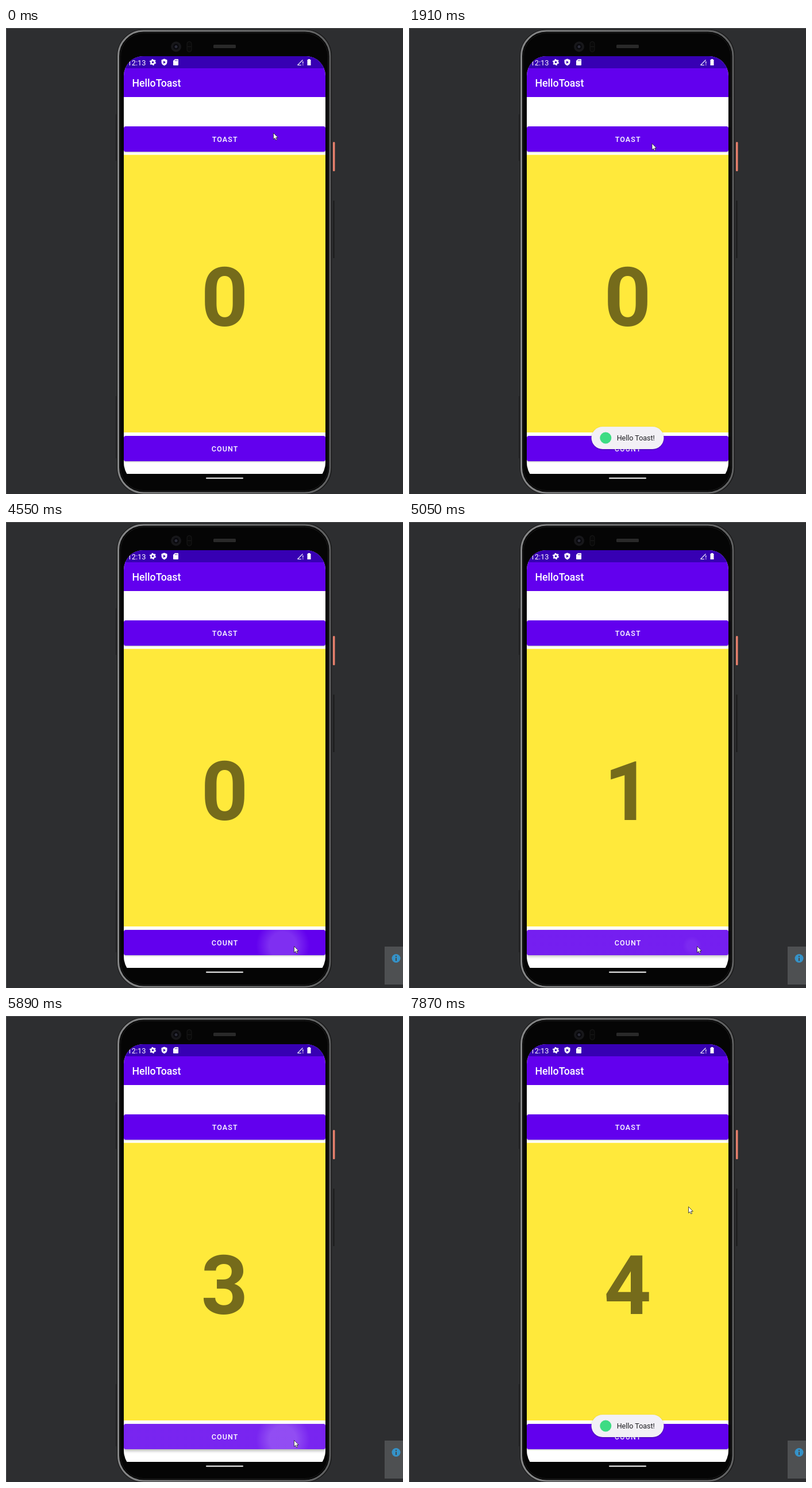
Recreate the animation shown at these times as an HTML page. Size 691 by 810 pixels, loop 7.99 s.

```html
<!DOCTYPE html>
<html lang="en">
<head>
<meta charset="utf-8">
<title>HelloToast</title>
<style>
html, body { margin: 0; width: 100%; height: 100%; overflow: hidden; background: #2d2e30; }
svg { display: block; width: 691px; height: 810px; font-family: Roboto, sans-serif; }
.label { font-size: 12.5px; font-weight: 500; letter-spacing: 1.1px; fill: #fff; text-anchor: middle; }
#toast { transform-origin: 380.5px 712.5px; }
#pill { filter: drop-shadow(0 1px 1px rgba(0,0,0,.3)); }
</style>
</head>
<body>
<svg viewBox="0 0 691 810">
  <defs>
    <clipPath id="screen"><path d="M205 83a34 34 0 0 1 34-34h283a34 34 0 0 1 34 34v672a40 40 0 0 1-5.400 20H210.400a40 40 0 0 1-5.400-20z"/></clipPath>
    <clipPath id="clip0"><rect x="205" y="171" width="351" height="44" rx="3.500"/></clipPath>
    <clipPath id="clip1"><rect x="205" y="709" width="351" height="44" rx="3.500"/></clipPath>
    <radialGradient id="glow">
      <stop offset=".5" stop-color="#fff"/>
      <stop offset="1" stop-color="#fff" stop-opacity="0"/>
    </radialGradient>
    <linearGradient id="metal">
      <stop offset="0" stop-color="#858687"/>
      <stop offset="1" stop-color="#5f6061"/>
    </linearGradient>
  </defs>

  <!-- Desktop and phone body -->
  <rect width="691" height="810" fill="#2d2e30"/>
  <path d="M0 .5H691M.5 0V810" stroke="#505254"/>
  <path d="M191.500 150v81M191.500 640v108" stroke="#1c1c1d"/>
  <path d="M570.500 300v100" stroke="#1a1a1b" stroke-width="2"/>
  <rect x="569" y="198" width="3.500" height="51" rx="1.500" fill="#e8806c"/>
  <rect x="193" y="2.500" width="374" height="808" rx="46" fill="#181818"/>
  <rect x="195.500" y="5" width="368.500" height="803" rx="44" fill="#050505" stroke="url(#metal)" stroke-width="3"/>
  <rect x="199" y="8.500" width="361.500" height="796" rx="41" fill="none" stroke="#1d1d1d"/>
  <circle cx="296" cy="32.500" r="9" fill="#17171a"/>
  <circle cx="296" cy="32.500" r="5" fill="#09090d"/>
  <circle cx="296" cy="32.500" r="2.500" fill="#2b2c39"/>
  <rect x="315" y="23.500" width="8" height="18" rx="4" fill="#090909" stroke="#191919"/>
  <path d="M316 32.500h6" stroke="#191919"/>
  <rect x="361" y="29" width="39" height="6" rx="1.500" fill="#292929"/>
  <path d="M349 782.500h63" stroke="#fff" stroke-width="2" stroke-linecap="round"/>

  <g clip-path="url(#screen)">
    <rect x="205" y="49" width="351" height="726" fill="#fff"/>
    <rect x="205" y="49" width="351" height="71" fill="#6200ee"/>
    <rect x="205" y="49" width="351" height="21" fill="#3700b3"/>
    <text x="211.500" y="64.500" font-size="12.800" fill="#fff">12:13</text>
    <g fill="#fff">
      <circle cx="255.500" cy="59.500" r="3.100" fill="none" stroke="#fff" stroke-width="2.600"/>
      <circle cx="255.500" cy="59.500" r="4.800" fill="none" stroke="#fff" stroke-width="1.600" stroke-dasharray="2.500 2.527"/>
      <path d="M275.500 53.500l5 2v3.500q0 4.500-5 6.500-5-2-5-6.500v-3.500z"/>
      <path d="M274 57l4 2.500-4 2.500z" fill="#3700b3"/>
      <path d="M294 54h5q1 0 1 1v9q0 1-1 1h-7q-1 0-1-1v-7z"/>
      <path d="M294.500 55.500v2m1.800-2v2m1.800-2v2" stroke="#3700b3" stroke-width=".8"/>
      <path d="M507.500 64.500h6.500m-6.500 0l9-9" fill="none" stroke="#fff" stroke-width="1.100"/>
      <path d="M516.800 58v4m0 1.200v1.500" stroke="#fff" stroke-width="1.200"/>
      <path d="M526 54h3v1h1.500v10h-6v-10h1.500z"/>
    </g>
    <text x="219.500" y="102.300" font-size="17.700" font-weight="500" fill="#fff">HelloToast</text>

    <rect x="205" y="220.500" width="351" height="482.500" fill="#ffe93b"/>
    <text id="digit" x="380.500" y="517.800" font-size="143" font-weight="700" text-anchor="middle" fill="#000" fill-opacity=".54">0</text>

    <rect id="button0" x="205" y="171" width="351" height="44" rx="3.500" fill="#6200ee"/>
    <g id="ripple0" clip-path="url(#clip0)"></g>
    <text class="label" x="381.200" y="197.500">TOAST</text>
    <rect id="button1" x="205" y="709" width="351" height="44" rx="3.500" fill="#6200ee"/>
    <g id="ripple1" clip-path="url(#clip1)"></g>
    <text class="label" x="381.200" y="735.500">COUNT</text>

    <g id="toast">
      <rect id="pill" x="317.500" y="693" width="126" height="39" rx="19.500" fill="#f2f0f5"/>
      <g id="message">
        <circle cx="342.300" cy="712.500" r="10" fill="#3ddc84"/>
        <text x="361.700" y="717.200" font-size="12.500" fill="#1b1b1f">Hello Toast!</text>
      </g>
    </g>
  </g>

  <g id="notice">
    <rect x="659" y="738" width="32" height="66" fill="#4e5052"/>
    <circle cx="679" cy="758.500" r="7.500" fill="#3592c8"/>
    <path d="M679 754v2m0 1.500v5.500" stroke="#45484a" stroke-width="2"/>
  </g>
  <path id="cursor" d="M.5.500v11l2.500-2.300 1.800 3.800 1.800-.8-1.700-3.700h3.400z" fill="#fff" stroke="#222" stroke-width=".8"/>
</svg>

<script>
const LOOP = 7990, NOTICE_AT = 2270;
const MOVE_TIME = 360, HOLD = 180, RIPPLE_TIME = 660;
const TOAST_DELAY = 240, TOAST_END = 2370;

const START = { x: 465, y: 182 };
const MOVES = [
  { at: 120, x: 440, y: 192 },
  { at: 520, x: 422, y: 196 },
  { at: 1910, x: 484, y: 710 },
  { at: 3670, x: 501, y: 737 },
  { at: 6010, x: 467, y: 182 },
  { at: 6760, x: 430, y: 187 },
  { at: 7510, x: 486, y: 331 },
];
const CENTER = { x: 380.5, y: [193, 731] };

const $ = id => document.getElementById(id);
const clamp = v => Math.max(0, Math.min(1, v));
const mix = (a, b, k) => a + (b - a) * k;
const easeOut = k => 1 - (1 - k) ** 3;

function pointer(t) {
  return MOVES.reduce((p, m) => {
    const k = easeOut(clamp((t - m.at) / MOVE_TIME));
    return { x: mix(p.x, m.x, k), y: mix(p.y, m.y, k) };
  }, START);
}

// Each press lands on the button under the pointer.
const presses = [1100, 4490, 5040, 5350, 5830, 7050].map(at => {
  const p = pointer(at), button = p.y < 400 ? 0 : 1;
  const circle = document.createElementNS('http://www.w3.org/2000/svg', 'circle');
  circle.setAttribute('fill', 'url(#glow)');
  $('ripple' + button).append(circle);
  return { at, ...p, button, circle };
});
const toasts = presses.filter(p => p.button === 0);
const counts = presses.filter(p => p.button === 1);

function drawButtons(t) {
  const lift = [0, 0];
  for (const { at, x, y, button, circle } of presses) {
    const age = t - at, on = age >= 0 && age < RIPPLE_TIME;
    circle.style.display = on ? '' : 'none';
    if (!on) continue;
    const left = RIPPLE_TIME - age, shift = clamp(.05 + .0018 * age);
    circle.setAttribute('cx', mix(x, CENTER.x, shift));
    circle.setAttribute('cy', mix(y, CENTER.y[button], shift));
    circle.setAttribute('r', 10 + .6 * age);
    circle.setAttribute('opacity', Math.min(.28, .02 + .0027 * age) * clamp(left / 230));
    lift[button] = Math.max(lift[button], clamp(age / 250) * clamp(left / 100));
  }
  lift.forEach((e, i) => {
    $('button' + i).style.filter = `drop-shadow(0 ${1 + 2 * e}px ${1 + 1.5 * e}px rgba(0,0,0,.28))`;
  });
}

function drawToast(t) {
  const shown = Math.max(...toasts.map(({ at }) => Math.min(
    clamp((t - at - TOAST_DELAY) / 180),
    1 - clamp((t - at - TOAST_END) / 300))));
  $('toast').style.transform = `scale(${mix(.94, 1, shown)})`;
  $('toast').style.opacity = clamp(shown * 3.1);
  $('message').style.opacity = shown;
}

function frame(now) {
  const t = now % LOOP, { x, y } = pointer(t);
  $('cursor').setAttribute('transform', `translate(${x} ${y})`);
  drawButtons(t);
  drawToast(t);
  $('digit').textContent = counts.filter(p => p.at + HOLD <= t).length;
  $('notice').style.display = t >= NOTICE_AT ? '' : 'none';
  requestAnimationFrame(frame);
}
requestAnimationFrame(frame);
</script>
</body>
</html>
```
